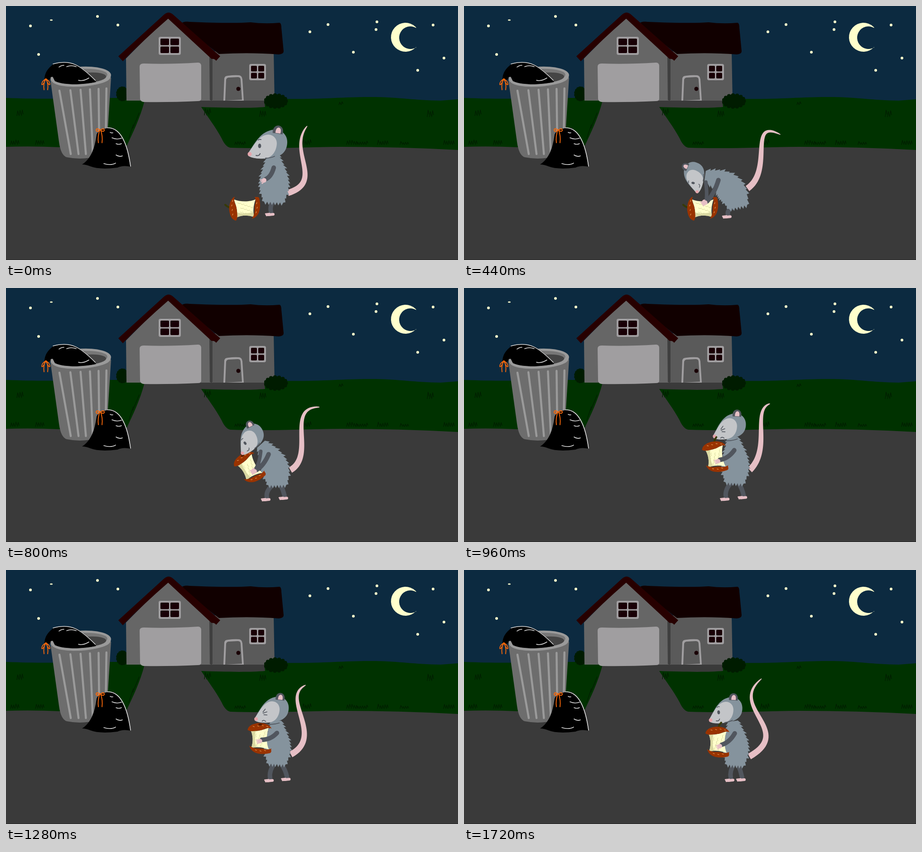
Animation, 998 px wide and 561 px high, one loop 2.04 s. Source, as an HTML page with a canvas:

```html
<!DOCTYPE html>
<html lang="en">
<head>
<meta charset="utf-8">
<title>Midnight snack</title>
<style>
html, body { margin: 0; width: 100%; height: 100%; overflow: hidden; background: #3a3a3a; }
canvas { display: block; width: 998px; height: 561px; }
</style>
</head>
<body>
<canvas id="stage" width="998" height="561"></canvas>
<script>
const ctx = document.getElementById('stage').getContext('2d');
const FUR = '#85939d', FACE = '#c3c5c8', DARK = '#51565e', PINK = '#e6bfc5', NOSE = '#e5a5ab';
const LIGHT = '#a09ea0', CREAM = '#ffffcc', RUST = '#993300', ORANGE = '#ff6a0a', ROAD = '#3a3a3a';
const GRASS = '#003200', SHADE = '#001e00', CORE = '#d9d8a2', SHINE = '#dcdcdc', RIM = '#9a9a9a';

// ---------- helpers ----------
function fill(path, color) {
  ctx.fillStyle = color;
  ctx.fill(new Path2D(path));
}
function line(path, color, w) {
  ctx.strokeStyle = color;
  ctx.lineWidth = w;
  ctx.lineCap = ctx.lineJoin = 'round';
  ctx.stroke(new Path2D(path));
}
const bend = (a, knee, b) => `M${a}Q${knee} ${b}`;
function polygon(points, color) {
  fill('M' + points.map(p => p.join()).join('L') + 'Z', color);
}
function oval(x, y, rx, ry, color) {
  ctx.beginPath();
  ctx.ellipse(x, y, rx, ry, 0, 0, 7);
  ctx.fillStyle = color;
  ctx.fill();
}
function box(x, y, w, h, r, color) {
  ctx.beginPath();
  ctx.roundRect(x, y, w, h, r);
  ctx.fillStyle = color;
  ctx.fill();
}
function local(x, y, angle, scale, draw) {
  ctx.save();
  ctx.translate(x, y);
  ctx.rotate(angle);
  ctx.scale(scale, scale);
  draw();
  ctx.restore();
}
const rad = deg => deg * Math.PI / 180;
function seeded(seed) {
  return () => (seed = seed * 16807 % 2147483647) / 2147483647;
}

// Mixes numbers, lists and objects; anything else comes from b
function mix(a, b, t) {
  if (typeof a === 'number') return a + (b - a) * t;
  if (Array.isArray(a)) return a.map((v, i) => mix(v, b[i], t));
  if (typeof a !== 'object') return b;
  return Object.fromEntries(Object.keys(b).map(k => [k, mix(a[k], b[k], t)]));
}

// Point on a Bezier curve of any degree
function bezier(p, t) {
  while (p.length > 1) p = p.slice(1).map((q, i) => mix(p[i], q, t));
  return p[0];
}
// Point and its unit normal, which lies to the left of the walking direction
function along(p, t) {
  const [x, y] = bezier(p, t), [u, v] = bezier(p, t + 0.01);
  const len = Math.hypot(u - x, v - y);
  return { x, y, nx: (v - y) / len, ny: (x - u) / len };
}

// ---------- scenery ----------
function moon(x, y, r) {
  const tip = 0.742, bite = 1.042;
  ctx.beginPath();
  ctx.arc(x, y, r, tip, 2 * Math.PI - tip);
  ctx.arc(x + 11, y + 1, r * 0.78, -bite, bite, true);
  ctx.fillStyle = CREAM;
  ctx.fill();
}
function sky() {
  ctx.fillStyle = '#0c2a40';
  ctx.fillRect(0, 0, 998, 561);
  const stars = [[54, 44], [202, 23], [247, 42], [72, 107], [671, 57], [711, 41], [767, 102],
    [819, 35], [817, 52], [943, 42], [967, 115], [909, 142]];
  for (const [x, y] of stars) oval(x, y, 3, 3, CREAM);
  oval(100, 31, 3, 1.6, CREAM);
  moon(882, 69, 32);
}
function tuft(x, y, n, h, rnd) {
  for (let i = 0; i < n; i++) {
    const px = x + i * 5;
    line(`M${px},${y}l2,${-h * (0.6 + 0.4 * rnd())}l2,${h * 0.6}`, SHADE, 1.3);
  }
}
function ground() {
  fill('M0,203 C100,207 160,203 250,203 L600,205 C690,207 750,200 815,201 C870,202 900,208 960,209 L998,206 V330 H0Z', GRASS);
  fill('M0,311 Q60,309 120,312 L267,308 C280,280 296,248 306,209 L570,207 L572,223 C540,226 480,225 431,223 C446,246 462,266 476,292 Q485,312 496,313 C580,316 650,312 740,311 Q870,311 998,318 V561 H0Z', ROAD);
  ctx.fillStyle = '#262626';
  ctx.fillRect(0, 560, 998, 1);
  const rnd = seeded(7);
  for (const x of [10, 65, 505, 655, 752, 775, 820, 870, 966]) tuft(x, 306, 3 + 2 * rnd(), 6 + 6 * rnd(), rnd);
  for (const x of [24, 438, 560, 930]) tuft(x, 239 + 8 * rnd(), 3, 15, rnd);
  tuft(735, 218, 2, 8, rnd);
  line('M294,236 L280,270 M281,262 L271,293', SHADE, 1.3);
}
function bush(x, y, rx, ry) {
  oval(x, y, rx, ry, '#001c00');
  for (let a = 0; a < 6.28; a += 0.42) oval(x + rx * 0.9 * Math.cos(a), y + ry * 0.88 * Math.sin(a), 4, 4, '#001c00');
}
function pane(x, y, w, h) {
  box(x, y, w, h, 4, LIGHT);
  const pw = (w - 11) / 2, ph = (h - 11) / 2;
  for (const i of [0, 1]) for (const j of [0, 1])
    box(x + 4 + i * (pw + 3), y + 4 + j * (ph + 3), pw, ph, 2, '#190006');
}
function house() {
  bush(257, 194, 11, 14);
  fill('M454,100 L591,102 L593,209 H454Z', '#5a5a5a');
  fill('M265,116 L358,22 L452,112 V209 H266Z', '#666666');
  fill('M449,110 L456,112 V208 H450Z', '#3f3f3f');
  fill('M385,40 Q392,33 405,35 Q500,39 540,36 Q570,40 604,37 Q608,38 608,48 L613,100 Q613,106 602,107 Q540,102 470,106Z', '#110000');
  fill('M248,111 L349,19 Q359,10 369,19 L473,111 L464,121 Q460,116 454,117 L358,28 Q306,73 258,122Z', '#270000');
  pane(337, 68, 49, 40);
  pane(537, 128, 37, 36);
  fill('M295,134 Q295,127 304,127 Q360,129 424,125 Q431,125 431,133 V205 Q431,210 424,210 Q360,213 304,212 Q297,211 296,205Z', LIGHT);
  fill('M480,209 L482,160 Q483,154 490,154 Q504,152 515,153 Q521,154 522,162 L525,209Z', LIGHT);
  fill('M484,209 L486,163 Q487,158 493,158 L512,157 Q518,157 518,163 L521,207Z', '#595959');
  oval(513, 183, 4.5, 4.5, '#190006');
  bush(596, 210, 25, 15);
}

// Two loops and two tails; `drop` tells how far the loops hang
function bow(x, y, drop, length) {
  for (const s of [-1, 1])
    line(`M${x},${y} q${s * 9},${drop - 7} ${s * 9},${drop} q${s * -2},4 ${s * -9},${-drop}
      m${s},0 q${s * 5},${length / 2} ${s * 3},${length}`, ORANGE, 1.8);
}
function can() {
  fill('M98,163 L117,300 Q121,330 134,334 Q168,341 205,331 Q221,322 223,300 L232,158Z', '#6d6d6d');
  for (let i = 0; i < 6; i++)
    line(`M${118 + 25 * i - 0.85 * i * i},${187 - i} L${143 + 17.6 * i - 0.45 * i * i},327`, RIM, 4.5);
  local(165, 156, -0.06, 1, () => {
    oval(0, 0, 67, 22, RIM);
    oval(0, -1, 59, 16, '#777777');
    oval(18, 3, 38, 11, '#454545');
  });
  fill('M85,163 C85,145 96,135 105,128 C125,121 150,126 160,132 C178,143 190,156 199,168 C175,174 130,176 108,166 L103,156 Q97,165 85,163Z', '#000');
  line('M101,159 C101,175 140,177 165,175 C205,172 228,165 229,155', RIM, 5);
  line('M104,128 C145,117 165,132 197,164', SHINE, 1.5);
  line('M117,135 q5,-4 11,-4 M134,134 q10,-4 21,0 M160,164 q10,3 23,-5', SHINE, 1.6);
  bow(88, 161, 12, 24);
}
function bag() {
  fill('M168,350 C188,337 196,314 200,284 C204,273 222,268 236,269 C250,276 264,296 268,318 Q271,340 276,355 Q258,351 246,357 Q206,362 186,354 Q176,350 168,350Z', '#000');
  line('M224,269 C255,268 269,310 275,354', SHINE, 1.7);
  line('M230,279 q3,2 6,1 M234,291 q10,5 21,1 M243,304 q6,3 12,0 M243,329 q7,5 14,2 M216,348 q15,5 26,-1', SHINE, 1.6);
  bow(208, 274, 1, 28);
}

// ---------- apple core, stem to the left ----------
function apple([x, y, deg], stem) {
  local(x, y, rad(deg), 1, () => {
    if (stem) line('M-30,-1 Q-38,-3 -43,-8', '#363a08', 4);
    fill('M-24,-20 C-10,-14 12,-14 24,-20 C19,-6 18,8 21,19 Q0,12 -18,20 C-14,5 -20,-8 -24,-20Z', CREAM);
    fill('M-17,9 Q0,14 19,8 L21,19 Q0,12 -18,20Z', CORE);
    for (let i = 0; i < 11; i++) line(`M${-15 + i * 7 % 29},${-12 + i * 2.2} q3,3 6,0`, CORE, 1.1);
    fill('M-22,-26 C-33,-21 -36,-2 -33,10 C-31,20 -26,26 -19,27 C-14,20 -17,8 -18,0 C-18,-8 -26,-14 -22,-26Z', RUST);
    fill('M22,-26 C25,-23 28,-28 32,-23 C36,-8 36,18 16,23 C23,12 22,4 22,-2 C22,-10 27,-14 22,-26Z', RUST);
    for (let i = 0; i < 7; i++) line(`M${(i % 2 ? 28 : -26) - i % 3},${-18 + i * 5} l-1,3`, '#e39a55', 1.2);
    if (!stem) oval(-31, -1, 2, 4, '#4d1c00');
  });
}

// ---------- possum ----------
function tail(curve) {
  const n = 40, sides = [[], []];
  for (let i = 0; i <= n; i++) {
    const { x, y, nx, ny } = along(curve, i / n), r = 0.7 + 6.2 * Math.pow(1 - i / n, 0.55);
    sides[0].push([x + nx * r, y + ny * r]);
    sides[1].push([x - nx * r, y - ny * r]);
  }
  polygon([...sides[0], ...sides[1].reverse()], PINK);
}

// Spine from neck to hip, arched backwards by `hunch`
function spineOf({ neck, hip, hunch }) {
  const [dx, dy] = [hip[0] - neck[0], hip[1] - neck[1]], len = Math.hypot(dx, dy);
  const [mx, my] = mix(neck, hip, 0.5);
  return [neck, [mx + dy / len * hunch, my - dx / len * hunch], hip];
}
function torso(spine, width) {
  const n = 13, rump = 6, sides = [[], []];
  const edge = (t, side, out) => {
    const { x, y, nx, ny } = along(spine, t);
    const r = side * (out + width * (0.42 + 0.58 * Math.sin(2.7 * Math.pow(t, 1.2))));
    return [x + nx * r, y + ny * r];
  };
  for (let i = 0; i < n; i++) {
    const spike = 3.5 + 1.5 * Math.sin(i * 2.7);
    [1, -1].forEach((side, k) => sides[k].push(edge(i / n, side, -1), edge((i + 1) / n, side, spike)));
  }
  const { nx, ny } = along(spine, 1), hem = [];
  for (let i = 0; i <= rump * 2; i++) {
    const [x, y] = mix(edge(1, 1, 0), edge(1, -1, 0), i / rump / 2), d = i % 2 ? 8 : 1;
    hem.push([x - ny * d, y + nx * d]);
  }
  polygon([...sides[0], ...hem, ...sides[1].reverse()], FUR);
}
function leg(hip, [x, y]) {
  const top = [hip[0] + (x + 4 - hip[0]) * 0.35, hip[1] - 1];
  line(bend(top, [x - 1, (hip[1] + y) / 2 - 3], [x + 2, y - 5]), DARK, 10);
  line(`M${x + 7},${y}L${x - 3},${y + 1}`, PINK, 6);
  for (let i = -1; i < 2; i++) line(`M${x + i},${y + i * 2}l-9,1`, PINK, 2.5);
}
function arm(from, [x, y], w) {
  const [mx, my] = mix(from, [x, y], 0.5), angle = Math.atan2(from[1] - y, from[0] - x);
  line(bend(from, [mx + 5, my + 6], [x + 4, y - 3]), DARK, w);
  local(x, y, angle / 2, 1, () => {
    oval(0, 0, 5, 5, PINK);
    for (const a of [-4, 0, 4]) line(`M0,${a / 2}L-7,${a}`, PINK, 2.6);
  });
}

const MARKS = {
  open: 'M23,-30 q3,-2 6,-1 M18,4 q7,2 9,-4 M39,10 Q50,10 59,6',
  squint: 'M22,-16 L28,-23 M22,-13 L32,-16 M24,-9 L32,-8 M19,7 Q23,3 28,8 M28,14 Q45,18 62,13',
  shut: 'M23,-24 l2,6 l6,-2 M28,7 l4,5 M28,9 l6,-1'
};
function head([x, y, deg, scale], eye) {
  local(x, y, rad(deg), scale, () => {
    fill('M0,0 C16,-24 28,-50 58,-53 C78,-53 88,-38 87,-24 C86,-4 74,10 40,11 Q12,12 1,5Z', FUR);
    fill('M0,0 C16,-22 26,-42 46,-42 C58,-41 64,-32 64,-22 C63,-4 52,11 34,11 Q12,12 1,5Z', FACE);
    local(67, -53, 0.15, 1, () => {
      fill('M-11,9 C-15,-15 15,-15 11,9Z', DARK);
      fill('M-5,8 C-7,-9 9,-9 6,8Z', PINK);
    });
    oval(4, 1, 4.5, 4.5, NOSE);
    if (eye === 'open') oval(26, -17, 3.4, 5, DARK);
    line(MARKS[eye], DARK, 1.9);
  });
}

function possum(p) {
  const spine = spineOf(p), shoulder = bezier(spine, 0.28);
  if (p.layer === 'ground') apple(p.core, p.stem);
  tail(p.tail);
  p.feet.forEach(f => leg(p.hip, f));
  torso(spine, p.width);
  if (p.layer === 'tucked') apple(p.core, p.stem);
  if (p.bothArms) {
    const [x, y] = bezier(spine, 0.05);
    arm([x - 4, y + 12], [p.hand[0] - 2, p.hand[1] - 2], 8);
  }
  head(p.head, p.eye);
  if (p.layer === 'held') apple(p.core, p.stem);
  arm(shoulder, p.hand, 10);
}

// Key poses. head: nose x, y, tilt, size; core: x, y, tilt
const stand = {
  neck: [589, 328], hip: [591, 432], hunch: 4, width: 32, head: [534, 326, 0, 1], eye: 'open',
  tail: [[622, 413], [705, 388], [620, 320], [665, 265]],
  hand: [570, 385], feet: [[583, 460]], core: [527, 447, 0], layer: 'ground', stem: true
};
const sniff = {
  ...stand, neck: [530, 373], hip: [605, 433], hunch: 32, width: 31, head: [490, 415, -54, 0.81],
  tail: [[628, 402], [697, 350], [618, 310], [664, 263]], hand: [540, 426], feet: [[584, 461]]
};
const grab = {
  ...sniff, neck: [532, 376], hip: [605, 442], hunch: 34, head: [512, 413, -74, 0.75], eye: 'shut',
  tail: [[626, 403], [685, 362], [625, 249], [697, 283]], hand: [533, 434], feet: [[581, 465]], bothArms: true
};
const lift = {
  ...grab, neck: [563, 345], hip: [599, 434], hunch: 18, width: 30, head: [519, 366, -36, 0.8], eye: 'open',
  tail: [[628, 402], [685, 370], [615, 262], [692, 263]],
  hand: [549, 405], feet: [[613, 464], [574, 467]], core: [537, 397, 60], layer: 'tucked', stem: false
};
const taste = {
  neck: [603, 326], hip: [597, 428], hunch: 2, width: 30, head: [560, 314, 5, 0.88], eye: 'squint',
  tail: [[632, 402], [678, 350], [640, 272], [670, 253]],
  hand: [565, 375], feet: [[616, 462], [577, 466]], core: [561, 365, 90], layer: 'held', stem: true
};
const chew = {
  ...taste, neck: [592, 339], hip: [599, 427], hunch: 4, width: 28, head: [541, 338, -7, 0.88], eye: 'open',
  tail: [[627, 411], [723, 378], [580, 288], [656, 255]],
  hand: [558, 380], feet: [[620, 462], [584, 464]], core: [560, 377, 90], stem: false
};
const smile = {
  ...chew, neck: [594, 334], hip: [599, 430], hunch: 6, head: [541, 331, -5, 0.87],
  tail: [[630, 412], [732, 355], [580, 302], [657, 240]],
  hand: [565, 389], feet: [[612, 463], [587, 464]], core: [560, 380, 90], stem: true
};
const look = { ...mix(sniff, grab, 1.05), eye: 'open' };
const raise = mix(lift, taste, 0.75);
const swallow = { ...mix(taste, chew, 0.6), eye: 'squint' };

const LOOP = 2040;
const SCENES = [[0, stand], [240, sniff], [440, look], [640, grab], [800, lift], [960, raise],
  [1160, taste], [1280, swallow], [1440, chew], [1720, smile]];

function tick() {
  const t = performance.now() % LOOP;
  sky();
  ground();
  house();
  can();
  bag();
  possum(SCENES.findLast(([start]) => start <= t)[1]);
  requestAnimationFrame(tick);
}
tick();
</script>
</body>
</html>
```
